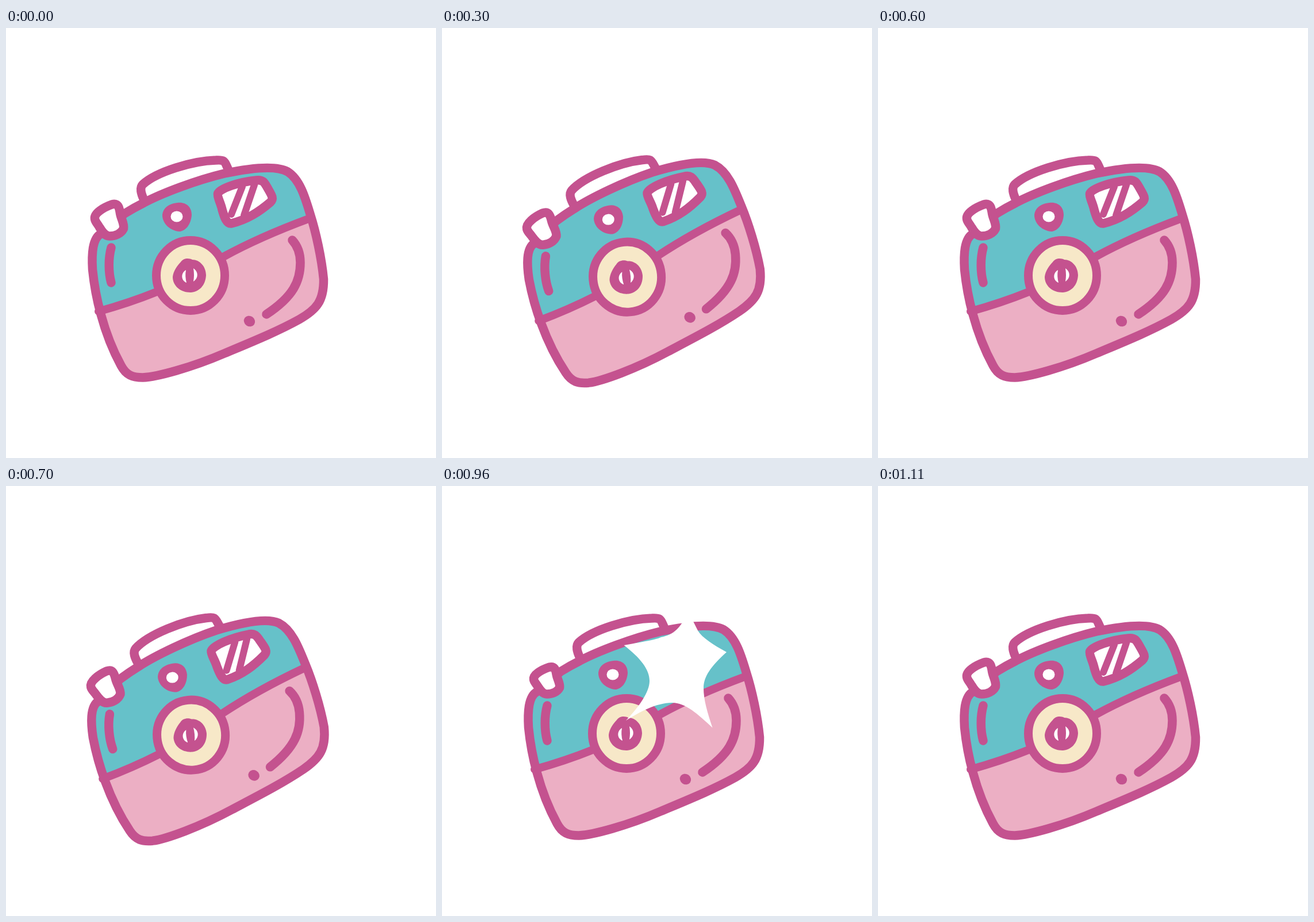
Write an HTML page with a canvas that moves like this. It is 748 px wide and 748 px high and loops after 1.64 s.

```html
<!DOCTYPE html>
<html lang="en">
<head>
<meta charset="utf-8">
<title>Camera flash</title>
<style>
  html, body { margin: 0; width: 100%; height: 100%; overflow: hidden; background: #fff; }
  canvas { display: block; width: 748px; height: 748px; }
</style>
</head>
<body>
<canvas id="stage" width="748" height="748"></canvas>
<script>
const ctx = document.getElementById('stage').getContext('2d');
const LOOP = 1640;
const INK = '#c4528f', TEAL = '#66c1c9', PINK = '#ecafc4', CREAM = '#f7e8c8', WHITE = '#fff';
const path = d => new Path2D(d);

const body = path('M165 358C150 366 149 395 150.5 420C154 455 160 480 165 498C175 535 188 565 200 587' +
  'C209 604 220 608 238 608C262 607 322 591 380 566C430 545 472 528 510 507C540 490 553 475 552.5 437' +
  'C549 400 539 355 529.5 325C521 297 512 264 490 250C470 238.5 425 243.5 380 253C330 265 270 288 240 304Q222 313 206 323Z');
const lower = path('M160 493Q215 478 262 459L378 398C422 374 472 352 526 332L600 332V650H140V493Z');
const divider = path('M161 493Q215 478 262 459M378 398C422 374 472 352 526 332');
const handle = path('M240 299C235 288 232 278 238 272C262 250 325 231 365 230C382 229 380 232 387 247');
const knob = path('M154.5 332C153 322 170 312 184 307C195 304 197 312 198.5 322C200 332 206 340 204.5 349' +
  'C200 358 190 362 180 362C171 362 166 352 161 344C157 338 155 336 154.5 332Z');
const finder = path('M368.5 288C372 279 405 268 435 265C448 263 450 270 456 280C463 292 466 297 460 303' +
  'C440 320 420 333 392 340C384 341 380 330 376 316C374 305 367 294 368.5 288Z');
const stripes = path('M411 276L392 324M432 273L414 326');
const eye = path('M272 327C272 315 281 306 298 304C313 302 323 311 323 325C322 341 313 353 302 354C286 353 273 341 272 327Z');
const iris = path('M290 433C291 423 298 413 304 407C309 400 318 400 324 403C337 403 348 415 348 430' +
  'C347 448 336 459 321 460C304 460 290 449 290 433Z');
const slits = path('M313 421C304 426 304 439 314 443Q311 432 313 421ZM326 418C335 424 335 435 326 441Q328 430 326 418Z');
const shineLeft = path('M183 382C178 400 178 425 183 443');
const shineRight = path('M498 369C508 380 512 392 512 408C512 440 500 467 453 498');
const burst = path('M218 251C275 295 307 335 307 375C307 415 270 465 225 513C270 485 330 451 385 451' +
  'C430 450 475 490 526 538C508 485 495 440 495 400C495 360 520 325 575 275C530 250 490 225 475 200' +
  'L440 130C420 190 390 215 347 223C331 231 300 236 218 251Z');

function fill(shape, color) {
  ctx.fillStyle = color;
  ctx.fill(shape);
}

function line(shape, width = 15.5) {
  ctx.strokeStyle = INK;
  ctx.lineWidth = width;
  ctx.stroke(shape);
}

function oval(x, y, rx, ry, tilt = 0) {
  const p = new Path2D();
  p.ellipse(x, y, rx, ry, tilt, 0, Math.PI * 2);
  return p;
}

function scaled(shape, x, y, sx, sy) {
  const p = new Path2D();
  p.addPath(shape, new DOMMatrix().translate(x, y).scale(sx, sy).translate(-x, -y));
  return p;
}

function drawCamera(pressed) {
  fill(handle, WHITE);
  line(handle);

  fill(body, TEAL);
  ctx.save();
  ctx.clip(body);
  fill(lower, PINK);
  ctx.restore();
  line(divider, 14);
  line(body);

  const button = pressed ? scaled(knob, 205, 362, 0.9, 0.85) : knob;
  fill(button, WHITE);
  line(button);

  fill(finder, WHITE);
  line(stripes, 12);
  line(finder);

  fill(eye, INK);
  fill(oval(297, 328, 10.5, 9.5), WHITE);

  const lens = oval(321, 430.5, 59.5, 61);
  fill(lens, CREAM);
  line(lens, 15);
  fill(iris, INK);
  fill(slits, WHITE);

  line(shineLeft);
  line(shineRight);
  fill(oval(423.5, 510, 10, 9, 0.6), INK);
}

function draw(t) {
  const flashing = t >= 900 && t < 1110;
  const tilted = t < 800 && Math.floor(t / 100) % 2 === 1;

  ctx.fillStyle = WHITE;
  ctx.fillRect(0, 0, 748, 748);
  ctx.lineCap = ctx.lineJoin = 'round';

  ctx.save();
  if (tilted) {
    ctx.translate(351.5, 419);
    ctx.rotate(-5 * Math.PI / 180);
    ctx.translate(-351.5, -419);
  }
  drawCamera(flashing);
  ctx.restore();

  // The flash grows from the window in 30 ms steps.
  if (flashing) {
    const size = Math.floor((t - 900) / 30) / 4;
    if (size > 0) fill(scaled(burst, 415, 303, size, size), WHITE);
  }
}

const start = performance.now();
function tick() {
  draw((performance.now() - start) % LOOP);
  requestAnimationFrame(tick);
}
tick();
</script>
</body>
</html>
```
